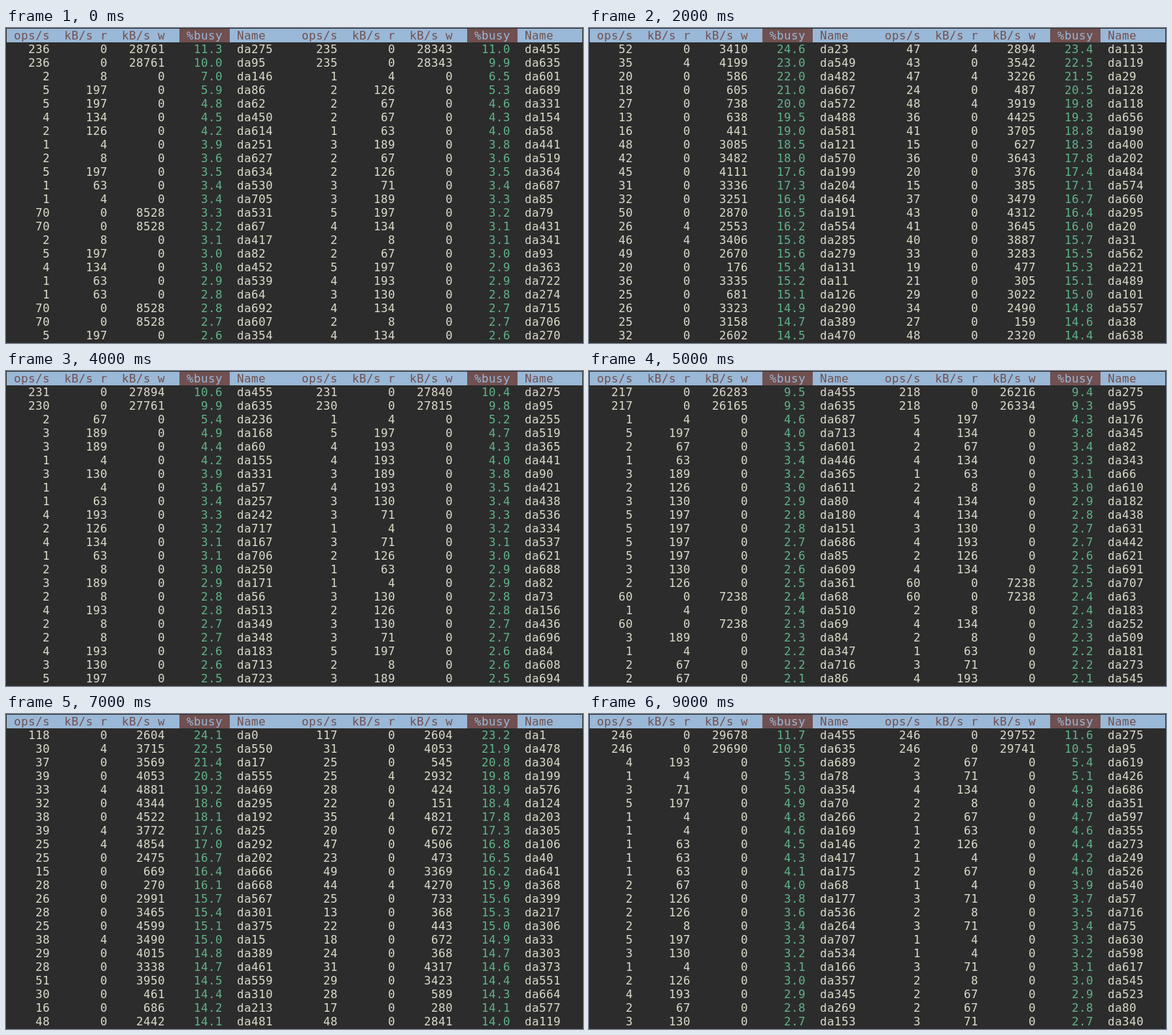
An HTML page with a canvas for the animation above (10000 ms loop, 802 by 439 pixels).

```html
<!DOCTYPE html>
<html lang="en">
<head>
<meta charset="utf-8">
<title>Disk activity</title>
<style>
html, body { margin: 0; width: 100%; height: 100%; overflow: hidden; background: #2c2c2c; }
canvas { display: block; }
</style>
</head>
<body>
<canvas id="stage" width="802" height="439"></canvas>
<script>
const ctx = document.getElementById('stage').getContext('2d', { alpha: false });
const CELL_W = 10, CELL_H = 19, PAD = 1, ASCENT = 15, PANE = 40, ROWS = 44;
const BG = '#2c2c2c', FG = '#dcdccc', RED = '#705050', BLUE = '#9ab8d7', GREEN = '#60b48a';
const HEADER = ' ops/s  kB/s r  kB/s w          Name';
const RIGHT_EDGES = [6, 14, 22, 30];
const KNOTS = [4, 8, 16, 28, 43];

function randomizer(seed) {
  const rnd = () => (seed = seed * 16807 % 2147483647) / 2147483647;
  return (a, b) => a + Math.floor(rnd() * (b - a + 1));
}

// Read load: large blocks of 63 kB plus small ones of 4 kB
function blocks(between, maxLarge, maxSmall) {
  const large = between(0, maxLarge);
  const small = between(large ? 0 : 1, maxSmall);
  return [large + small, large * 63 + small * 4];
}

// Each kind gives [ops, read, written] for a disk at a place in its shelf
const KINDS = {
  quiet: between => [...blocks(between, 3, 2), 0],
  burst: between => [between(8, 17), between(5, 155), between(550, 1400)],
  mixed: between => [between(31, 50), blocks(between, 2, 2)[1], between(1200, 2500)],
  heavy: (between, place) => place > 31
    ? [between(13, 30), 0, between(106, 812)]
    : [between(25, 51), Math.max(0, between(-2, 1)) * 4, between(2300, 4900)]
};

// %busy falls with rank along straight pieces between the knots
function busyAt(rank, levels) {
  let k = 0;
  while (k < KNOTS.length - 2 && rank > KNOTS[k + 1]) k++;
  const part = (rank - KNOTS[k]) / (KNOTS[k + 1] - KNOTS[k]);
  return (levels[k] + (levels[k + 1] - levels[k]) * part).toFixed(1);
}

function makeScreen({ kind, seed, lead, levels, writers = [], writerLoad }) {
  const between = randomizer(seed);
  const rows = lead.map(row => row.split(' '));
  const used = new Set(rows.map(row => row[4]));
  const [first, last] = kind === 'heavy' ? [8, 41] : [56, 95];
  for (let i = rows.length; i < ROWS; i++) {
    let place, name;
    do {
      place = between(first, last);
      name = 'da' + (between(0, 7) * 90 + place);
    } while (used.has(name));
    used.add(name);
    const load = writers.includes(i) ? writerLoad : KINDS[kind](between, place);
    rows.push([...load.map(String), busyAt(i, levels), name]);
  }
  return rows;
}

const SCREENS = [
  { kind: 'quiet', seed: 1301, levels: [7, 4.8, 3.6, 3.1, 2.6],
    lead: ['236 0 28761 11.3 da275', '235 0 28343 11.0 da455',
      '236 0 28761 10.0 da95', '235 0 28343 9.9 da635'],
    writers: [24, 26, 38, 40], writerLoad: [70, 0, 8528] },
  { kind: 'burst', seed: 2417, levels: [10.6, 8.8, 6.8, 5.6, 4.9],
    lead: ['76 0 1698 12.9 da0', '76 0 1698 11.3 da1',
      '217 0 26070 10.8 da635', '10 150 361 10.8 da616',
      '216 0 26151 10.6 da95', '217 0 26344 10.2 da455',
      '216 0 25877 9.8 da275'],
    writers: [37, 40, 41], writerLoad: [78, 0, 9374] },
  { kind: 'heavy', seed: 4127, levels: [22, 20, 18, 15.8, 14.4],
    lead: ['52 0 3410 24.6 da23', '47 4 2894 23.4 da113'] },
  { kind: 'heavy', seed: 5309, levels: [20.9, 19, 17.4, 14.8, 13.6],
    lead: ['59 0 3604 23.0 da24', '54 4 2507 21.9 da114',
      '46 0 3119 21.4 da463', '50 0 3627 21.1 da643'] },
  { kind: 'quiet', seed: 915, levels: [5.4, 4.4, 3.4, 2.9, 2.5],
    lead: ['231 0 27894 10.6 da455', '231 0 27840 10.4 da275',
      '230 0 27761 9.9 da635', '230 0 27815 9.8 da95'] },
  { kind: 'quiet', seed: 6203, levels: [4.6, 3.5, 2.9, 2.5, 2.1],
    lead: ['217 0 26283 9.5 da455', '218 0 26216 9.4 da275',
      '217 0 26165 9.3 da635', '218 0 26334 9.3 da95'],
    writers: [29, 30, 31, 34], writerLoad: [60, 0, 7238] },
  { kind: 'mixed', seed: 7411, levels: [21.8, 20.6, 18.6, 16.7, 14.5],
    lead: ['134 0 2847 23.8 da0', '54 134 1691 23.5 da267',
      '39 67 1703 23.4 da705', '35 252 1136 23.0 da269',
      '132 0 2847 21.8 da1'] },
  { kind: 'heavy', seed: 7753, levels: [21.4, 19.2, 17, 15.1, 14],
    lead: ['118 0 2604 24.1 da0', '117 0 2604 23.2 da1'] },
  { kind: 'heavy', seed: 8819, levels: [18.1, 17.4, 15.3, 14.2, 13.2],
    lead: ['35 0 3717 21.5 da295', '41 0 4443 20.2 da99',
      '27 0 2901 19.7 da206', '34 8 4141 18.6 da299'] },
  { kind: 'quiet', seed: 9677, levels: [5.5, 5, 4.5, 3.4, 2.7],
    lead: ['246 0 29678 11.7 da455', '246 0 29752 11.6 da275',
      '246 0 29690 10.5 da635', '246 0 29741 10.5 da95'] }
].map(makeScreen);

function put(text, col, row, color) {
  ctx.fillStyle = color;
  [...text].forEach((ch, i) => {
    if (ch !== ' ') ctx.fillText(ch, PAD + (col + i) * CELL_W, PAD + row * CELL_H + ASCENT);
  });
}

function bar(col, cols, color) {
  ctx.fillStyle = color;
  ctx.fillRect(PAD + col * CELL_W, PAD, cols * CELL_W, CELL_H);
}

function draw(rows) {
  ctx.fillStyle = BG;
  ctx.fillRect(0, 0, 802, 439);
  ctx.font = '16px "DejaVu Sans Mono", monospace';
  bar(0, 2 * PANE, BLUE);
  for (const left of [0, PANE]) {
    put(HEADER, left, 0, RED);
    bar(left + 24, 7, RED);
    put('%busy', left + 25, 0, BLUE);
  }
  rows.forEach((row, i) => {
    const left = i % 2 * PANE;
    const line = 1 + Math.floor(i / 2);
    row.forEach((word, field) => {
      const col = field === 4 ? 32 : RIGHT_EDGES[field] - word.length;
      put(word, left + col, line, field === 3 ? GREEN : FG);
    });
  });
}

let shown = -1;
function tick() {
  const index = Math.floor(performance.now() / 1000) % SCREENS.length;
  if (index !== shown) draw(SCREENS[shown = index]);
  requestAnimationFrame(tick);
}
tick();
</script>
</body>
</html>
```
